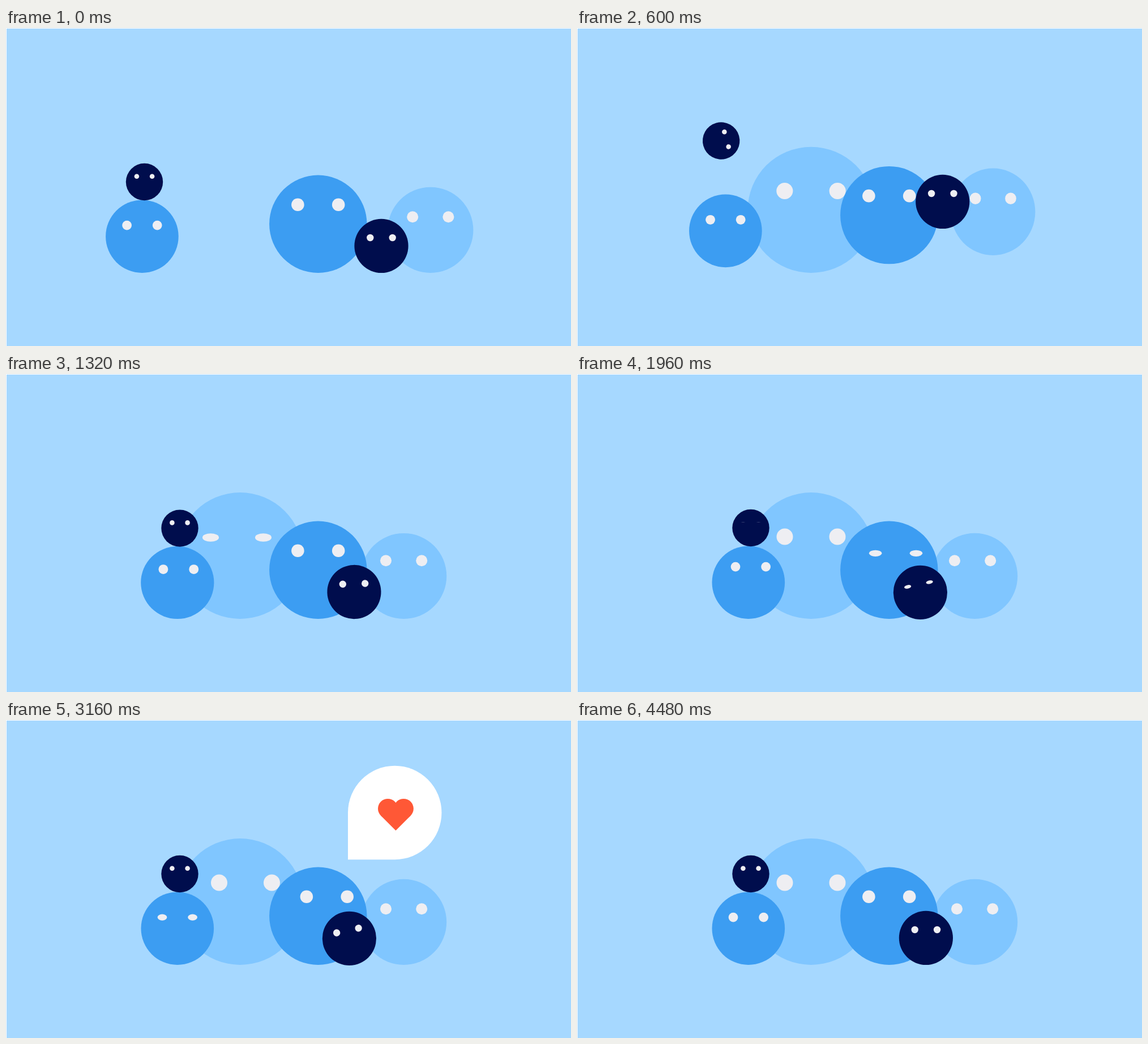
Recreate the animation shown at these times as an HTML page with a canvas. Size 998 by 561 pixels, loop 5000 ms.

```html
<!DOCTYPE html>
<html lang="en">
<head>
<meta charset="utf-8">
<title>Round friends</title>
<style>
html, body { margin: 0; width: 100%; height: 100%; overflow: hidden; background: #a6d8ff; }
canvas { display: block; }
</style>
</head>
<body>
<canvas id="stage" width="998" height="561"></canvas>
<script>
const ctx = document.getElementById('stage').getContext('2d');
const LOOP = 5000, STEP = 40, GROUND = 432;
const SKY = '#a6d8ff', PALE = '#80c6ff', BLUE = '#3c9df2', NAVY = '#000d4d', EYE = '#eeeef2';

const clamp = v => Math.max(0, Math.min(1, v));
const span = (t, a, b) => clamp((t - a) / (b - a));
const smooth = u => u * u * (3 - 2 * u);
const easeOut = (u, p) => 1 - Math.pow(1 - u, p);
const mix = (a, b, u) => a + (b - a) * u;
const arc = (u, h) => 4 * h * u * (1 - u);

// Damped wobble that follows a landing
function wobble(t, at, amp) {
  const d = t - at;
  return d > 0 ? amp * Math.exp(-d / 80) * Math.sin(d * Math.PI / 100) : 0;
}

// Crouch before a jump
const crouch = (t, a, b, amp) => amp * Math.sin(Math.PI * span(t, a, b));

// Each look is [start, end, x, y], reached from the previous one
function gaze(t, looks) {
  let x = 0, y = 0;
  for (const [a, b, nx, ny] of looks) {
    const u = smooth(span(t, a, b));
    x = mix(x, nx, u);
    y = mix(y, ny, u);
  }
  return [x, y];
}

function openness(t, blinks) {
  let open = 1;
  for (const c of blinks) open = Math.min(open, Math.abs(t - c) / 120);
  return Math.max(0.03, open);
}

function oval(x, y, rx, ry, color) {
  ctx.fillStyle = color;
  ctx.beginPath();
  ctx.ellipse(x, y, rx, ry, 0, 0, Math.PI * 2);
  ctx.fill();
}

// Squash keeps the foot of the body in place
function drawBall(t, b, x, foot, squash = 0, turn = 0) {
  const [gx, gy] = gaze(t, b.looks);
  const open = openness(t, b.blinks);
  ctx.save();
  ctx.translate(x, foot);
  ctx.scale(1 + squash, 1 - squash);
  ctx.translate(0, -b.r);
  ctx.rotate(turn);
  oval(0, 0, b.r, b.r, b.color);
  for (const side of [-1, 1]) {
    oval(side * b.gap + gx, b.eyeY + gy, b.eye, b.eye * open, EYE);
  }
  ctx.restore();
}

const big = {
  r: 111.5, color: PALE, gap: 46.5, eyeY: -33.5, eye: 14.5,
  looks: [[1260, 1380, -11, 3], [1640, 1760, 0, 0], [2300, 2420, 9.5, 0], [4100, 4220, 0, 0]],
  blinks: [1380, 1700, 2360, 3760, 4160]
};
const right = {
  r: 75.6, color: PALE, gap: 31.6, eyeY: -23.2, eye: 10,
  looks: [[1200, 1300, 0, -4], [1500, 1600, -4, -4], [2120, 2240, 0, 0]],
  blinks: [3760, 4360]
};
const middle = {
  r: 86.2, color: BLUE, gap: 35.9, eyeY: -34, eye: 11.3,
  looks: [[1780, 1900, 8, 9], [1900, 2020, 15.5, 0], [4040, 4160, 0, 0]],
  blinks: [800, 1900, 4100]
};
const left = {
  r: 64.3, color: BLUE, gap: 26.8, eyeY: -19.6, eye: 8.4,
  looks: [[1240, 1400, 4, -8], [2040, 2200, 0, 0]],
  blinks: [3240]
};
const rider = {
  r: 32.7, color: NAVY, gap: 13.6, eyeY: -9.7, eye: 4.3,
  looks: [], blinks: [460, 1960, 2740]
};
const kid = {
  r: 47.6, color: NAVY, gap: 19.7, eyeY: -14.4, eye: 6.2,
  looks: [], blinks: [2020, 2700]
};

function drawBig(t) {
  if (t <= 240) return;
  const fall = span(t, 240, 360);
  drawBall(t, big, 413.5, GROUND - 435 * (1 - fall * fall), wobble(t, 360, 0.078));
}

function drawRight(t) {
  const u = span(t, 480, 880);
  const air = u > 0 && u < 1 ? -0.035 * Math.abs(1 - 2 * u) : 0;
  const squash = air + crouch(t, 400, 480, 0.03) + wobble(t, 880, 0.18);
  const dip = 5 * crouch(t, 880, 960, 1);
  drawBall(t, right, mix(749.8, 702.6, smooth(span(t, 480, 800))), GROUND - arc(u, 37) + dip, squash);
}

function drawMiddle(t) {
  drawBall(t, middle, 551.3, GROUND - arc(span(t, 520, 820), 20), wobble(t, 820, 0.03));
}

function drawPair(t) {
  const squash = wobble(t, 1080, 0.1);
  const x = mix(240.4, 302.8, smooth(span(t, 480, 780)));
  drawBall(t, left, x, GROUND - arc(span(t, 480, 760), 10), squash);

  const u = span(t, 520, 1080);
  const foot = 304.2 - arc(u, 148) + 2 * left.r * squash;
  drawBall(t, rider, mix(244.5, 307, easeOut(u, 1.15)), foot, 0, Math.PI * 2 * easeOut(u, 1.5));
}

function drawKid(t) {
  const u = span(t, 480, 960);
  const lean = smooth(span(t, 1200, 1700)) - smooth(span(t, 3360, 3800));
  const x = mix(663, 616.4, easeOut(u, 1.6)) - 10 * lean;
  const foot = GROUND - arc(u, 104) + lean;
  drawBall(t, kid, x, foot, wobble(t, 960, 0.08), -10 * lean / kid.r);
}

function bubbleSize(t) {
  const u = 1 - span(t, 2000, 2600);
  const grow = 1 + u * u * (1.7 - 2.7 * u);
  return grow * (1 - Math.pow(span(t, 3080, 3480), 3));
}

function drawBubble(t) {
  const size = bubbleSize(t);
  if (size < 0.002) return;
  const r = 83.4;
  ctx.save();
  ctx.translate(604, 246.2);
  ctx.scale(size, size);
  ctx.fillStyle = '#fff';
  ctx.beginPath();
  ctx.moveTo(0, 0);
  ctx.lineTo(0, -r);
  ctx.arc(r, -r, r, Math.PI, Math.PI * 2.5);
  ctx.closePath();
  ctx.fill();
  drawHeart(85.1, -90.5, 17.6);
  ctx.restore();
}

function drawHeart(x, y, r) {
  const d = r * 0.8, k = r * Math.SQRT1_2;
  for (const side of [-1, 1]) oval(x + side * d, y, r, r, '#ff5836');
  ctx.beginPath();
  ctx.moveTo(x, y - r * 0.6);
  ctx.lineTo(x + d + k, y + k);
  ctx.lineTo(x, y + d + 2 * k);
  ctx.lineTo(x - d - k, y + k);
  ctx.fill();
}

function draw(t) {
  ctx.fillStyle = SKY;
  ctx.fillRect(0, 0, 998, 561);
  drawBig(t);
  drawRight(t);
  drawMiddle(t);
  drawPair(t);
  drawKid(t);
  drawBubble(t);
  ctx.fillStyle = '#fff';
  ctx.fillRect(0, 0, 998, 1);
  ctx.fillRect(0, 0, 1, 561);
}

const start = performance.now();
function tick() {
  const t = (performance.now() - start) % LOOP;
  draw(Math.floor(t / STEP) * STEP);
  requestAnimationFrame(tick);
}
tick();
</script>
</body>
</html>
```
